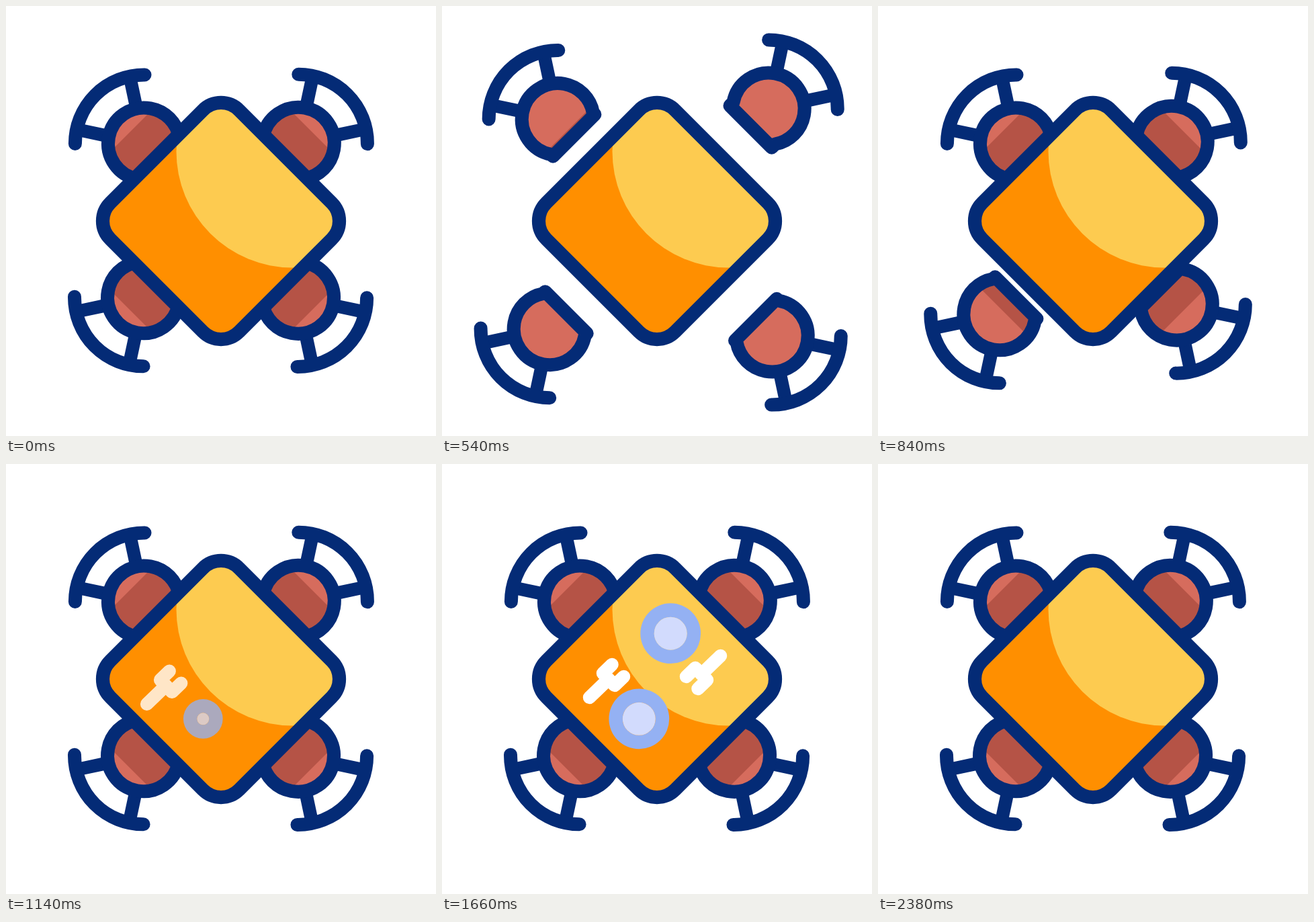
An HTML page with a canvas that plays this animation: 640 px wide and 640 px high, repeating every 2400 ms.

```html
<!DOCTYPE html>
<html lang="en">
<head>
<meta charset="utf-8">
<title>Table and chairs</title>
<style>
html, body { margin: 0; width: 100%; height: 100%; overflow: hidden; background: #fff; }
canvas { display: block; width: 100vmin; height: 100vmin; }
</style>
</head>
<body>
<canvas id="stage" width="640" height="640"></canvas>
<script>
const ctx = document.getElementById('stage').getContext('2d');
const LOOP = 2400, STEP = 20, TAU = Math.PI * 2;
const NAVY = '#042b76', SEAT = '#d66c5d', SHADE = '#b55346';
const ORANGE = '#ff8f00', YELLOW = '#fdcb50', RING = '#94b1f3', DISH = '#d2dbfd';

// Rest position, quarter turns, reach when pulled out, seat depth, start time
const chairs = [
  { x: 205.5, y: 205, turn: 0, dx: -45.5, dy: -50, depth: 34, start: 0 },
  { x: 435.3, y: 204.3, turn: 1, dx: 53, dy: -53.5, depth: 37.5, start: 80 },
  { x: 434.5, y: 434.3, turn: 2, dx: 57, dy: 57, depth: 34, start: 160 },
  { x: 204.6, y: 433.7, turn: 3, dx: -52, dy: 55, depth: 34.5, start: 240 }
];

// Each setting: plate centre, fork turned or not, show and hide start
const settings = [
  { x: 293.3, y: 379.3, flip: false, show: 884, hide: 1790 },
  { x: 340.2, y: 252.2, flip: true, show: 1180, hide: 1990 }
];
const SHOW = 480, HIDE = 390;

const clamp = v => Math.max(0, Math.min(1, v));
const wave = v => (1 - Math.cos(Math.PI * clamp(v))) / 2;

function bezier(x, a, b) {
  let lo = 0, hi = 1, t = 0.5;
  for (let i = 0; i < 24; i++) {
    t = (lo + hi) / 2;
    const px = 3 * (1 - t) * (1 - t) * t * a + 3 * (1 - t) * t * t * b + t * t * t;
    if (px < x) lo = t; else hi = t;
  }
  return t * t * (3 - 2 * t);
}

function pull(t) {
  return t < 400 ? wave(t / 400) : 1 - bezier(clamp((t - 400) / 440), 0.42, 0.4);
}

function stroke(color, width) {
  ctx.strokeStyle = color;
  ctx.lineWidth = width;
  ctx.stroke();
}

// Round back with a straight edge towards the table
function seatPath(depth) {
  const half = 44, a = Math.asin(half / 53.5);
  ctx.save();
  ctx.rotate(Math.PI / 4);
  ctx.beginPath();
  ctx.arc(0, 0, 53.5, a, TAU - a);
  ctx.lineTo(depth, -half);
  ctx.lineTo(depth, half);
  ctx.closePath();
  ctx.restore();
}

function drawChair(c, t) {
  const k = pull(t - c.start);
  const x = c.x + c.dx * k, y = c.y + c.dy * k;
  const place = () => { ctx.translate(x, y); ctx.rotate(c.turn * Math.PI / 2); };

  ctx.save();
  place();
  ctx.beginPath();
  for (const deg of [192, 258]) {
    const a = deg * Math.PI / 180;
    ctx.moveTo(56 * Math.cos(a), 56 * Math.sin(a));
    ctx.lineTo(100 * Math.cos(a), 100 * Math.sin(a));
  }
  stroke(NAVY, 19.5);
  ctx.beginPath();
  ctx.arc(0, 0, 102.6, Math.PI, Math.PI * 1.5 + 0.01);
  stroke(NAVY, 20);
  seatPath(c.depth);
  ctx.fillStyle = SEAT;
  ctx.fill();
  ctx.restore();

  // The table's shadow stays put while the seat slides under it
  ctx.save();
  ctx.save();
  place();
  seatPath(c.depth);
  ctx.restore();
  ctx.clip();
  ctx.beginPath();
  ctx.moveTo(320, 52);
  ctx.lineTo(588, 320);
  ctx.lineTo(320, 588);
  ctx.lineTo(52, 320);
  ctx.fillStyle = SHADE;
  ctx.fill();
  ctx.restore();

  ctx.save();
  place();
  seatPath(c.depth);
  stroke(NAVY, 20);
  ctx.restore();
}

function tablePath() {
  ctx.save();
  ctx.translate(320, 320);
  ctx.rotate(Math.PI / 4);
  ctx.beginPath();
  ctx.roundRect(-135.6, -135.6, 271.2, 271.2, 38);
  ctx.restore();
}

function drawTable() {
  ctx.save();
  tablePath();
  ctx.fillStyle = ORANGE;
  ctx.fill();
  ctx.clip();
  ctx.beginPath();
  ctx.arc(426.5, 216.5, 173, 0, TAU);
  ctx.fillStyle = YELLOW;
  ctx.fill();
  ctx.restore();
  tablePath();
  stroke(NAVY, 20.2);
}

function drawPlate(x, y, size) {
  const r = 34.7 * size, inner = Math.max(0, r - 10.2);
  ctx.beginPath();
  ctx.arc(x, y, r + 10.2, 0, TAU);
  ctx.closePath();
  ctx.moveTo(x + inner, y);
  ctx.arc(x, y, inner, 0, TAU);
  ctx.fillStyle = RING;
  ctx.fill('evenodd');
  ctx.beginPath();
  ctx.arc(x, y, inner, 0, TAU);
  ctx.fillStyle = DISH;
  ctx.fill();
}

function drawFork(flip, shift) {
  ctx.save();
  if (flip) {
    ctx.translate(634, 633);
    ctx.rotate(Math.PI);
  }
  ctx.translate(-shift, shift);
  ctx.beginPath();
  ctx.moveTo(219.5, 347.5);
  ctx.lineTo(248, 320);
  ctx.moveTo(253, 298.5);
  ctx.lineTo(239.5, 311.5);
  ctx.lineTo(257, 329.5);
  ctx.lineTo(270.5, 316.5);
  stroke('#fff', 19.5);
  ctx.restore();
}

function drawSetting(s, t) {
  const leaving = t >= s.hide;
  const v = leaving ? 1 - clamp((t - s.hide) / HIDE) : clamp((t - s.show) / SHOW);
  if (v <= 0) return;
  const k = wave(v);
  ctx.globalAlpha = Math.min(1, v * 1.46);
  drawFork(s.flip, 22 * (1 - k));
  drawPlate(s.x, s.y, leaving ? 0.55 + 0.45 * k : k);
  ctx.globalAlpha = 1;
}

function draw(t) {
  ctx.fillStyle = '#fff';
  ctx.fillRect(0, 0, 640, 640);
  ctx.lineCap = ctx.lineJoin = 'round';
  for (const c of chairs) drawChair(c, t);
  drawTable();
  for (const s of settings) drawSetting(s, t);
}

const begin = performance.now();
function tick() {
  const t = (performance.now() - begin) % LOOP;
  draw(Math.floor(t / STEP) * STEP);
  requestAnimationFrame(tick);
}
tick();
</script>
</body>
</html>
```
